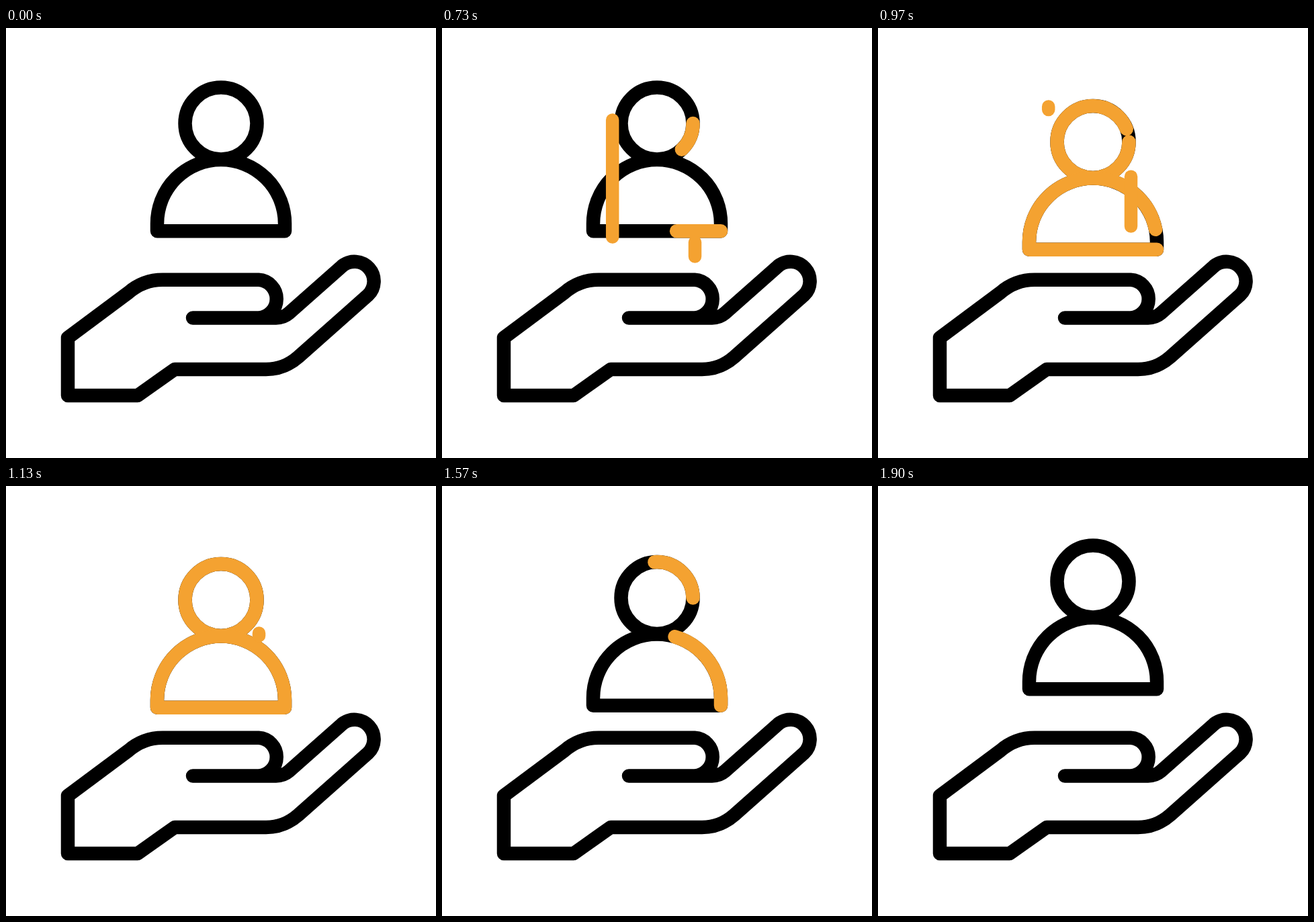
An HTML page without scripts for the animation above (2500 ms loop, 640 by 640 pixels).

```html
<!DOCTYPE html>
<html lang="en">
<head>
<meta charset="utf-8">
<title>Caring hand</title>
<style>
  html, body { margin: 0; height: 100%; overflow: hidden; background: #fff; }
  svg { display: block; width: 100vw; height: 100vh; }
  .ink { fill: none; stroke: #000; stroke-width: 20.5; stroke-linecap: round; stroke-linejoin: round; }
  .glow { stroke: #f4a231; }
  .trace { stroke-dasharray: 1 2; }
  .ray { stroke-width: 19.5; }
</style>
</head>
<body>
<svg viewBox="0 0 640 640">
  <defs>
    <g id="person">
      <path pathLength="1" d="M373.5 142A53.5 53.5 0 0 1 266.5 142A53.5 53.5 0 0 1 373.5 142"/>
      <path pathLength="1" d="M415 302.3H225V291A95 95 0 0 1 415 291V302.3"/>
    </g>
  </defs>

  <g class="ink">
    <path d="M278 431.5H402Q413 431.5 421 424.6L500.3 354.3A29 29 0 0 1 538.7 397.7L435 489.6C422 501 405 508 387 508H251L196 547H92V461L182 394C196 382 214 374.8 233 374.8H376A28.4 28.4 0 0 1 376 431.5"/>

    <!-- person dips twice while the outline is drawn, then erased -->
    <g>
      <animateTransform attributeName="transform" type="translate" dur="2.5s" repeatCount="indefinite"
        calcMode="spline" values="0 0;0 0;0 28.5;0 28.5;0 0;0 28.5;0 0;0 0"
        keyTimes="0;.2933;.4;.44;.5467;.6533;.76;1"
        keySplines="0 0 1 1;.333 0 .667 1;0 0 1 1;.333 0 .667 1;.333 0 .667 1;.333 0 .667 1;0 0 1 1"/>
      <use href="#person"/>
      <g class="glow trace" stroke-dashoffset="1" opacity="0">
        <animate attributeName="stroke-dashoffset" dur="2.5s" repeatCount="indefinite"
          calcMode="spline" values="1;1;0;0;-1;-1" keyTimes="0;.258;.411;.484;.701;1"
          keySplines="0 0 1 1;.333 0 .667 1;0 0 1 1;.333 0 .667 1;0 0 1 1"/>
        <animate attributeName="opacity" dur="2.5s" repeatCount="indefinite"
          calcMode="discrete" values="0;1;0" keyTimes="0;.26;.7"/>
        <use href="#person"/>
      </g>
    </g>

    <!-- rising rays -->
    <line class="glow ray" x1="253.7" x2="253.7" y1="332" y2="332" opacity="0">
      <animate attributeName="y2" dur="2.5s" repeatCount="indefinite" calcMode="spline"
        values="332;332;117;117" keyTimes="0;.1733;.32;1" keySplines="0 0 1 1;.333 0 .667 1;0 0 1 1"/>
      <animate attributeName="y1" dur="2.5s" repeatCount="indefinite" calcMode="spline"
        values="332;332;117;117" keyTimes="0;.2667;.4;1" keySplines="0 0 1 1;.333 0 .667 1;0 0 1 1"/>
      <animate attributeName="opacity" dur="2.5s" repeatCount="indefinite"
        calcMode="discrete" values="0;1;0" keyTimes="0;.186;.399"/>
    </line>
    <line class="glow ray" x1="376.5" x2="376.5" y1="340" y2="340" opacity="0">
      <animate attributeName="y2" dur="2.5s" repeatCount="indefinite" calcMode="spline"
        values="340;340;219;219" keyTimes="0;.2533;.4;1" keySplines="0 0 1 1;.333 0 .667 1;0 0 1 1"/>
      <animate attributeName="y1" dur="2.5s" repeatCount="indefinite" calcMode="spline"
        values="340;340;219;219" keyTimes="0;.3333;.4667;1" keySplines="0 0 1 1;.333 0 .667 1;0 0 1 1"/>
      <animate attributeName="opacity" dur="2.5s" repeatCount="indefinite"
        calcMode="discrete" values="0;1;0" keyTimes="0;.256;.465"/>
    </line>
  </g>
</svg>
</body>
</html>
```
